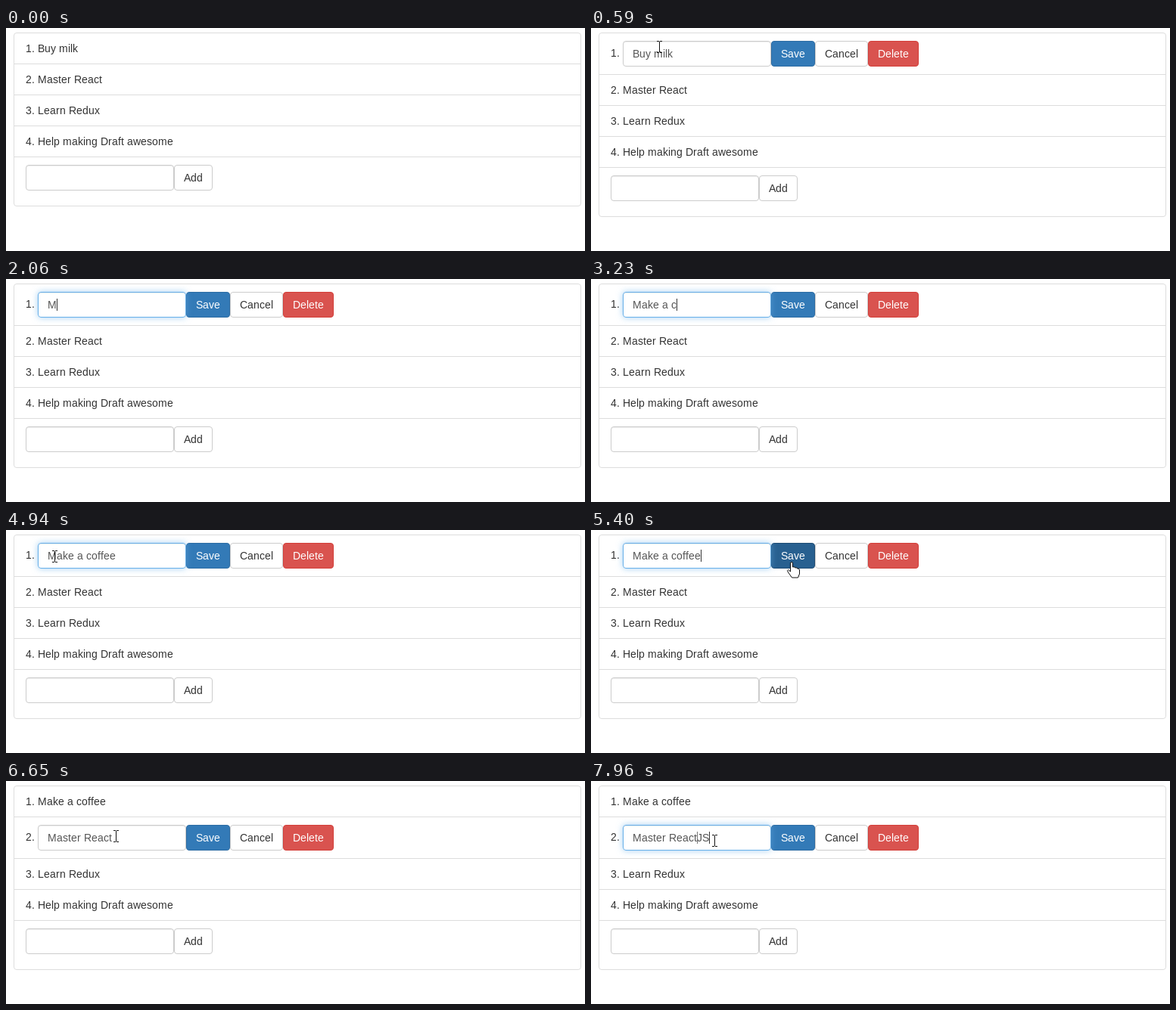
Recreate the animation shown at these times as an HTML page. Size 765 by 295 pixels, loop 8000 ms.

```html
<!DOCTYPE html>
<html lang="en">
<head>
<meta charset="utf-8">
<title>Todo list</title>
<style>
  * { box-sizing: border-box; }
  html, body { margin: 0; width: 100%; height: 100%; overflow: hidden; background: #fff; }
  body {
    position: relative;
    font: 14px/20px "Liberation Sans", Arial, sans-serif;
    font-kerning: none;
    color: #333;
    white-space: pre;
    cursor: default;
  }
  ul { position: absolute; left: 10px; top: 6px; width: 750px; margin: 0; padding: 0; list-style: none; }
  li { padding: 10px 15px; margin-bottom: -1px; border: 1px solid #ddd; }
  li:first-child { border-radius: 4px 4px 0 0; }
  li:last-child { border-radius: 0 0 4px 4px; padding-bottom: 20px; }
  .row { display: flex; align-items: flex-start; }
  .row .label { margin-top: 6px; }
  .field, .btn { flex: none; height: 34px; padding: 6px 12px; border: 1px solid #ccc; border-radius: 4px; }
  .field {
    position: relative; width: 196px; color: #555;
    box-shadow: inset 0 1px 1px rgba(0, 0, 0, .075);
  }
  .editing {
    border-color: color-mix(in srgb, #66afe9 calc(var(--glow) * 100%), #ccc);
    box-shadow: inset 0 1px 1px rgba(0, 0, 0, .075), 0 0 8px rgba(102, 175, 233, calc(var(--glow) * .6));
  }
  .save { background: #337ab7; border-color: #2e6da4; color: #fff; }
  .save.hover { background: #286090; border-color: #204d74; }
  .save.press { background: #204d74; border-color: #122b40; box-shadow: inset 0 3px 5px rgba(0, 0, 0, .125); }
  .delete { background: #d9534f; border-color: #d43f3a; color: #fff; }
  .selected { background: #3399ff; color: #fff; }
  .caret { position: absolute; top: 8px; width: 1px; height: 16px; background: #333; }
  .caret.faint { background: #777; }
  svg { position: absolute; left: 0; top: 0; overflow: visible; pointer-events: none; }
</style>
</head>
<body>
<ul id="list"></ul>
<svg id="pointer" width="1" height="1">
  <path id="ibeam" d="M-3 -7.5h3M1 -7.5h3M.5 -7V7M-3 7.5h3M1 7.5h3" fill="none" stroke="#111" shape-rendering="crispEdges"/>
  <path id="arrow" d="M.5 .5V16.5L4.2 13L6.8 18.5L9.2 17.4L6.7 12H11.5Z" fill="#fff" stroke="#1c1c24"/>
  <path id="hand" d="M-1.5 13V2a1.5 1.5 0 0 1 3 0V7q3 -1 3 1q3 -1 3 1q3 -.5 3 2v5l-2 5h-8l-5 -7q-2 -3 0 -3.5z" fill="#fff" stroke="#111"/>
</svg>
<script>
const LOOP = 8000;
const TICK = 75;
const FIRST = 'Make a coffee';
const SECOND = 'Master React';

const OPEN = 590, FOCUS = 1130, TYPE = 2060, REST = 4940, BLINK = 5400, PRESS = 5700, SAVED = 5800;
const REOPEN = 6650, REFOCUS = 6960, APPEND = 7880;

const STROKES = [
  { start: 70, end: 360, from: [310, 182], to: [90, 25] },
  { start: OPEN, end: 980, from: [90, 25], to: [87, 34] },
  { start: REST, end: BLINK, from: [64, 35], to: [265, 42] },
  { start: 5950, end: 6480, from: [265, 42], to: [114, 70] },
  { start: REOPEN, end: 7350, from: [145, 73], to: [163, 79] }
];

const $ = id => document.getElementById(id);
const clamp = p => Math.min(1, Math.max(0, p));
const ease = p => (1 - Math.cos(Math.PI * clamp(p))) / 2;

function el(tag, className, ...children) {
  const node = document.createElement(tag);
  node.className = className;
  node.append(...children);
  return node;
}

// Whole-pixel advances, as with hinted screen text.
const spacing = {};
function glyph(ch) {
  const node = el('span', '', ch);
  if (!(ch in spacing)) {
    document.body.append(node);
    const width = node.getBoundingClientRect().width;
    node.remove();
    spacing[ch] = Math.round(width) - width;
  }
  node.style.letterSpacing = spacing[ch] + 'px';
  return node;
}
const text = (str, className = '') => el('span', className, ...[...str].map(glyph));
const button = (label, className = '') => el('span', 'btn ' + className, text(label));

// After the first letter, keys come in quick pairs that gradually slow down.
function keyTime(i) {
  if (i === 0) return TYPE;
  const pair = (i - 1) >> 1;
  const gap = i % 2 ? 0 : 65 + pair ** 5 / 10;
  return TYPE + 160 + 240 * pair + 25 * pair ** 2 + gap;
}
const typedCount = t => [...FIRST].filter((_, i) => t >= keyTime(i)).length;

function stateAt(t) {
  const s = { first: t < PRESS ? 'Buy milk' : FIRST, row: -1, value: '', select: -1, carets: [] };
  if (t >= OPEN && t < SAVED) {
    s.row = 0;
    const count = typedCount(t);
    s.value = count ? FIRST.slice(0, count) : 'Buy milk';
    if (t >= FOCUS + TICK && t < TYPE) s.select = t < FOCUS + 2 * TICK ? 4 : 0;
    if (count && (t < REST || t >= BLINK) && t < PRESS) s.carets = [count];
  } else if (t >= REOPEN) {
    s.row = 1;
    const count = clamp(Math.floor((t - APPEND) / 80 + 1) / 2) * 2;
    s.value = SECOND + 'JS'.slice(0, count);
    if (t >= REFOCUS) s.carets = [SECOND.length, s.value.length];
  }
  return s;
}

function editor(s) {
  const field = el('span', 'field editing');
  const cut = s.select < 0 ? s.value.length : s.select;
  for (let i = 0; i <= s.value.length; i++) {
    if (s.carets.includes(i)) field.append(el('i', i < s.value.length ? 'caret faint' : 'caret'));
    if (i < cut) field.append(glyph(s.value[i]));
  }
  if (cut < s.value.length) field.append(text(s.value.slice(cut), 'selected'));
  return [field, button('Save', 'save'), button('Cancel'), button('Delete', 'delete')];
}

function build(s) {
  const items = [s.first, SECOND, 'Learn Redux', 'Help making Draft awesome'];
  const rows = items.map((item, i) => {
    const number = `${i + 1}. `;
    return i === s.row
      ? el('li', 'row', text(number, 'label'), ...editor(s))
      : el('li', '', text(number + item));
  });
  $('list').replaceChildren(...rows, el('li', 'row', el('span', 'field'), button('Add')));
}

function glowAt(t) {
  const fade = start => ease((t - start) / 150);
  return t < SAVED ? fade(FOCUS) - fade(PRESS) : fade(REFOCUS);
}

function drawPointer(t) {
  const stroke = STROKES.findLast(s => t >= s.start);
  const visible = stroke && (t < TYPE || t >= REST);
  $('pointer').style.display = visible ? '' : 'none';
  if (!visible) return;

  const { start, end, from, to } = stroke;
  const steps = Math.round((end - start) / TICK);
  const p = ease(Math.floor((t - start) / (end - start) * steps) / steps);
  const [x, y] = from.map((a, i) => Math.round(a + (to[i] - a) * p));
  $('pointer').style.transform = `translate(${x}px, ${y}px)`;

  const under = document.elementFromPoint(x, y);
  const shape = under?.closest('.btn') ? 'hand' : under?.closest('span') ? 'ibeam' : 'arrow';
  for (const id of ['ibeam', 'arrow', 'hand']) $(id).style.display = id === shape ? '' : 'none';

  const save = document.querySelector('.save');
  save?.classList.toggle('hover', save.contains(under));
  save?.classList.toggle('press', t >= PRESS && t < SAVED);
}

let shown = '';
const origin = performance.now();
function draw() {
  const t = (performance.now() - origin) % LOOP;
  const s = stateAt(t);
  const key = JSON.stringify(s);
  if (key !== shown) build(s);
  shown = key;
  $('list').style.setProperty('--glow', glowAt(t).toFixed(3));
  drawPointer(t);
  requestAnimationFrame(draw);
}
draw();
</script>
</body>
</html>
```
